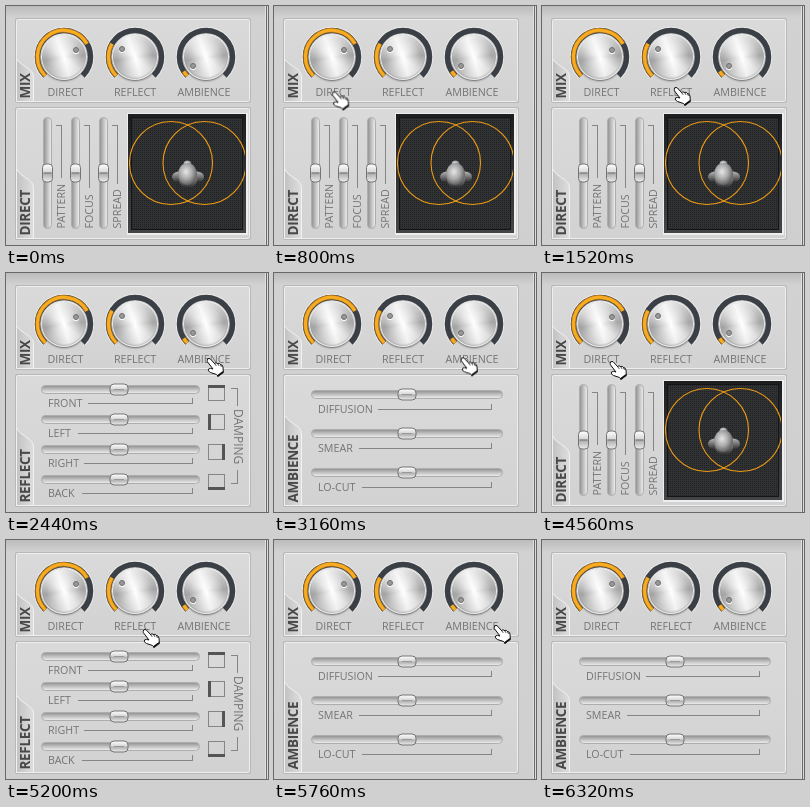
Recreate the animation shown at these times as an HTML page. Size 262 px wide and 239 px high, loop 6880 ms.

```html
<!DOCTYPE html>
<html lang="en">
<head>
<meta charset="utf-8">
<title>Mixer panels</title>
<style>
  html, body { margin: 0; width: 100%; height: 100%; overflow: hidden; background: #d1d1d1; }
  svg { position: absolute; left: 0; top: 0; display: block; }
  text { font: 10.7px "Open Sans", "Noto Sans", sans-serif; fill: #747474; }
  .tab { font-size: 13.5px; font-weight: 700; letter-spacing: -.3px; fill: #484848; }
  .flap { fill: url(#flap); stroke: #f1f1f1; }
  .line { fill: none; stroke: #858585; shape-rendering: crispEdges; }
  .bar { stroke: #555; stroke-width: 3; shape-rendering: crispEdges; }
  .arc { fill: none; }
  .levels { fill: none; stroke: #c07c14; stroke-width: 4.5; }
  .levels + .levels { stroke: #f7ac22; stroke-width: 3; }
  .h { fill: url(#grooveH); stroke: #adadad; }
  .v { fill: url(#grooveV); stroke: #adadad; }

  .knob {
    position: absolute; top: 28px; width: 46px; height: 46px; border-radius: 50%;
    background:
      radial-gradient(circle, #fff 0, #fffa 18%, #fff0 55%),
      conic-gradient(from -20deg, #f6f6f6, #cacaca 60deg, #a6a6a6 105deg, #dedede 150deg,
        #f2f2f2 185deg, #cecece 225deg, #a4a4a4 280deg, #dcdcdc 325deg, #f6f6f6);
    box-shadow: inset 0 0 0 1px #eee, inset 0 -1px 2px 1px #7777, 0 1px 2px #0008;
  }
  .knob i {
    position: absolute; width: 4px; height: 4px; border: 1px solid #6c6c6c; border-radius: 50%;
    background: #999; box-shadow: 0 1px 0 #fff;
  }

  .panel { animation: 6880ms step-end infinite; }
  #direct { animation-name: direct; }
  #reflect { animation-name: reflect; }
  #ambience { animation-name: ambience; }
  #hand { animation: move 6880ms step-end infinite; }

  @keyframes direct {
    0%, 66.279% { opacity: 1; }
    26.744%, 75.581%, 100% { opacity: 0; }
  }
  @keyframes reflect {
    0%, 39.534%, 66.279%, 83.72%, 100% { opacity: 0; }
    26.744%, 52.906%, 75.581% { opacity: 1; }
  }
  @keyframes ambience {
    0%, 52.906% { opacity: 0; }
    39.534%, 83.72%, 100% { opacity: 1; }
  }
  /* Each glide advances once every 40 ms */
  @keyframes move {
    0% { transform: translate(-30px, 109px); }
    8.139% { transform: translate(-18px, 109px); animation-timing-function: steps(8, start); }
    12.79% { transform: translate(68px, 81px); }
    15.116% { transform: translate(67px, 81px); }
    16.279% { transform: translate(66px, 81px); }
    19.767% { transform: translate(66px, 81px); animation-timing-function: steps(5, start); }
    22.674% { transform: translate(131px, 80px); }
    30.232% { transform: translate(131px, 80px); animation-timing-function: steps(10, start); }
    36.046% { transform: translate(200px, 84px); }
    45.348% { transform: translate(200px, 84px); animation-timing-function: steps(9, start); }
    50.581% { transform: translate(137px, 81px); }
    56.395% { transform: translate(137px, 81px); animation-timing-function: steps(9, start); }
    61.627% { transform: translate(67px, 87px); }
    70.93% { transform: translate(67px, 87px); animation-timing-function: steps(5, start); }
    73.837% { transform: translate(136px, 88px); }
    77.906% { transform: translate(136px, 88px); animation-timing-function: steps(5, start); }
    80.813% { transform: translate(219px, 84px); }
    86.046% { transform: translate(220px, 84px); }
    88.372% { transform: translate(220px, 84px); animation-timing-function: steps(6, start); }
    91.859% { transform: translate(98px, 212px); }
    91.86%, 100% { transform: translate(-30px, 109px); }
  }
</style>
</head>
<body>
<svg width="262" height="239" viewBox="0 0 262 239">
  <defs>
    <linearGradient id="back" x2="0" y2="1">
      <stop stop-color="#bcbcbc"/><stop offset=".05" stop-color="#d2d2d2"/><stop offset="1" stop-color="#cfcfcf"/>
    </linearGradient>
    <linearGradient id="plate" x2="0" y2="1">
      <stop stop-color="#dadada"/><stop offset="1" stop-color="#d2d2d2"/>
    </linearGradient>
    <linearGradient id="flap">
      <stop stop-color="#c2c2c2"/><stop offset="1" stop-color="#dedede"/>
    </linearGradient>
    <linearGradient id="grooveH" x2="0" y2="1">
      <stop stop-color="#8e8e8e"/><stop offset=".45" stop-color="#bcbcbc"/><stop offset="1" stop-color="#f0f0f0"/>
    </linearGradient>
    <linearGradient id="grooveV">
      <stop stop-color="#8e8e8e"/><stop offset=".45" stop-color="#bcbcbc"/><stop offset="1" stop-color="#f0f0f0"/>
    </linearGradient>
    <linearGradient id="metal" x2="0" y2="1">
      <stop stop-color="#fff"/><stop offset=".45" stop-color="#d8d8d8"/>
      <stop offset=".55" stop-color="#b0b0b0"/><stop offset="1" stop-color="#eee"/>
    </linearGradient>
    <linearGradient id="frame" x2="0" y2="1">
      <stop stop-color="#1d1e20"/><stop offset="1" stop-color="#434547"/>
    </linearGradient>
    <radialGradient id="skin" cx=".42" cy=".4" r=".65">
      <stop stop-color="#e6e6e6"/><stop offset=".5" stop-color="#aaa"/><stop offset="1" stop-color="#555"/>
    </radialGradient>
    <linearGradient id="ear" x2="0" y2="1">
      <stop stop-color="#b5b5b5"/><stop offset="1" stop-color="#2c2c2c"/>
    </linearGradient>
    <pattern id="mesh" width="2" height="2" patternUnits="userSpaceOnUse">
      <rect width="2" height="2" fill="#303234"/><rect width="1" height="1" fill="#1f2022"/>
    </pattern>
    <clipPath id="screen"><rect x="123" y="111" width="116" height="115"/></clipPath>
    <g id="gripH">
      <rect x="-9" y="-5.5" width="18" height="11" rx="4" fill="url(#metal)" stroke="#747474"/>
      <path d="M-5 0H5" stroke="#999"/>
    </g>
    <g id="gripV">
      <rect x="-5" y="-9" width="10" height="18" rx="3.5" fill="url(#metal)" stroke="#747474"/>
      <path d="M-4 0H4" stroke="#666"/>
    </g>
    <path id="sweep" class="arc" d="M-18.7 18.7A26.5 26.5 0 1 1 18.7 18.7"/>
    <g id="dial">
      <use href="#sweep" stroke="#e9e9e9" stroke-width="7.5"/>
      <use href="#sweep" stroke="#3b4047" stroke-width="5.5"/>
    </g>
    <path id="levels" d="M39.3 69.7A26.5 26.5 0 1 1 81 37.8M110.3 69.7A26.5 26.5 0 0 1 106 37.800M181.300 69.700A26.500 26.500 0 0 1 177.800 65.400"/>
    <path id="box" class="line" d="M.5 .5H16.5V15.5H.5Z"/>
  </defs>

  <rect width="262" height="239" fill="url(#back)"/>
  <path d="M259.5 0V239" stroke="#e0e0e0"/>
  <path d="M260.5 0V239" stroke="#6a6a6a"/>
  <path d="M261.5 0V239" stroke="#dcdcdc"/>

  <g fill="url(#plate)" stroke="#eee">
    <rect x="9" y="12" width="236" height="85" rx="2" fill="#b8b8b8" stroke="none"/>
    <rect x="10.5" y="13.5" width="233" height="82" rx="1"/>
    <rect x="9" y="101" width="236" height="133" rx="2" fill="#b8b8b8" stroke="none"/>
    <rect x="10.5" y="102.5" width="233" height="130" rx="1"/>
  </g>

  <path class="flap" d="M10.5 53Q13 57 20 61Q27.5 65 27.5 71V95.500H10.5Z"/>
  <text class="tab" transform="translate(24 92.5) rotate(-90)">MIX</text>

  <use href="#dial" x="58" y="51"/>
  <use href="#dial" x="129" y="51"/>
  <use href="#dial" x="200" y="51"/>
  <use class="levels" href="#levels"/>
  <use class="levels" href="#levels"/>
  <g text-anchor="middle">
    <text x="59.5" y="90">DIRECT</text>
    <text x="129" y="90">REFLECT</text>
    <text x="198" y="90">AMBIENCE</text>
  </g>

  <g id="direct" class="panel">
    <path class="flap" d="M10.5 163Q13 168 20 172Q27.5 176 27.5 182V232.500H10.5Z"/>
    <text class="tab" transform="translate(24 229.5) rotate(-90)">DIRECT</text>
    <rect class="v" x="37.5" y="111.5" width="8" height="111" rx="4"/>
    <rect class="v" x="65.5" y="111.5" width="8" height="111" rx="4"/>
    <rect class="v" x="93.5" y="111.5" width="8" height="111" rx="4"/>
    <use href="#gripV" x="41.5" y="167"/>
    <use href="#gripV" x="69.5" y="167"/>
    <use href="#gripV" x="97.5" y="167"/>
    <path class="line" d="M50 119.5H55.5V172M78 119.5H83.5V182M106 119.5H111.5V178"/>
    <text transform="translate(59 222.5) rotate(-90)">PATTERN</text>
    <text transform="translate(87 222.5) rotate(-90)">FOCUS</text>
    <text transform="translate(115 222.5) rotate(-90)">SPREAD</text>

    <rect x="121" y="107" width="121" height="122" fill="#eee"/>
    <rect x="122" y="108" width="118" height="119" fill="url(#frame)"/>
    <rect x="125.5" y="111.5" width="111" height="112" fill="url(#mesh)" stroke="#141517"/>
    <g fill="none" stroke="#ee9b13" stroke-width="1.1" clip-path="url(#screen)">
      <circle cx="165" cy="157" r="41.5"/>
      <circle cx="198.5" cy="157" r="41.5"/>
    </g>
    <g fill="url(#ear)">
      <ellipse cx="173" cy="171" rx="7" ry="5.5"/>
      <ellipse cx="191" cy="171" rx="7" ry="5.5"/>
      <ellipse cx="182" cy="174" rx="9" ry="8"/>
    </g>
    <g fill="url(#skin)">
      <ellipse cx="181.5" cy="158" rx="4" ry="3.5"/>
      <ellipse cx="181.5" cy="168" rx="9.5" ry="11"/>
    </g>
  </g>

  <g id="reflect" class="panel">
    <path class="flap" d="M10.5 155Q13 160 20 164Q27.5 168 27.5 174V232.500H10.5Z"/>
    <text class="tab" transform="translate(24 229.5) rotate(-90)">REFLECT</text>
    <rect class="h" x="35.5" y="112.5" width="158" height="8" rx="4"/>
    <rect class="h" x="35.5" y="142.5" width="158" height="8" rx="4"/>
    <rect class="h" x="35.5" y="172.5" width="158" height="8" rx="4"/>
    <rect class="h" x="35.5" y="202.5" width="158" height="8" rx="4"/>
    <use href="#gripH" x="113" y="116.5"/>
    <use href="#gripH" x="113" y="146.5"/>
    <use href="#gripH" x="113" y="176.5"/>
    <use href="#gripH" x="113" y="206.5"/>
    <text x="42" y="134">FRONT</text>
    <text x="42" y="164">LEFT</text>
    <text x="42" y="194">RIGHT</text>
    <text x="42" y="224">BACK</text>
    <path class="line" d="M82 130.5H186.5V125M72 160.5H186.5V155M78 190.5H186.5V185M76 220.5H186.5V215"/>
    <use href="#box" x="202" y="112"/>
    <use href="#box" x="202" y="141"/>
    <use href="#box" x="202" y="171"/>
    <use href="#box" x="202" y="201"/>
    <path class="bar" d="M202 113.5H219M203.5 141V157M217.5 171V187M202 215.5H219"/>
    <path class="line" d="M225 115.5H231.5V133M231.5 197V210.5H225"/>
    <text transform="translate(227.5 136) rotate(90)" style="font-size:12px">DAMPING</text>
  </g>

  <g id="ambience" class="panel">
    <path class="flap" d="M10.5 142Q13 147 20 151Q27.5 155 27.5 161V232.500H10.5Z"/>
    <text class="tab" transform="translate(24 229.5) rotate(-90)">AMBIENCE</text>
    <rect class="h" x="37.5" y="117.5" width="191" height="8" rx="4"/>
    <rect class="h" x="37.5" y="156.5" width="191" height="8" rx="4"/>
    <rect class="h" x="37.5" y="195.5" width="191" height="8" rx="4"/>
    <use href="#gripH" x="133" y="121.5"/>
    <use href="#gripH" x="133" y="160.5"/>
    <use href="#gripH" x="133" y="199.5"/>
    <text x="44" y="140">DIFFUSION</text>
    <text x="44" y="179">SMEAR</text>
    <text x="44" y="218">LO-CUT</text>
    <path class="line" d="M104 136.5H217.5V131M85 175.5H217.5V170M88 214.5H217.5V209"/>
  </g>
</svg>

<div class="knob" style="left:35px"><i style="left:32px;top:13px"></i></div>
<div class="knob" style="left:106px"><i style="left:7px;top:12px"></i></div>
<div class="knob" style="left:177px"><i style="left:7px;top:29px"></i></div>

<svg width="262" height="239" viewBox="0 0 262 239">
  <g id="hand" stroke="#111" stroke-linejoin="round" stroke-linecap="round">
    <path fill="#fff" d="M1.2 3.2Q1 .6 4 1.6L8.5 6.5Q10 5 11.5 6.5Q13.5 5.7 14.5 7.5Q16.5 7.5 17 10L17.3 15L12 19.2L10.5 17.5L4.5 15.5Q1.3 14 2.5 12Q4 10.7 7 12L1.6 5Z"/>
    <path fill="none" stroke-width=".8" d="M8.5 6.5L10 8.5M11.5 6.5L12.8 8.5M14.5 7.5L15.3 9.5"/>
    <path stroke-width="2" d="M16.8 15.2L12 18.8"/>
  </g>
</svg>
</body>
</html>
```
